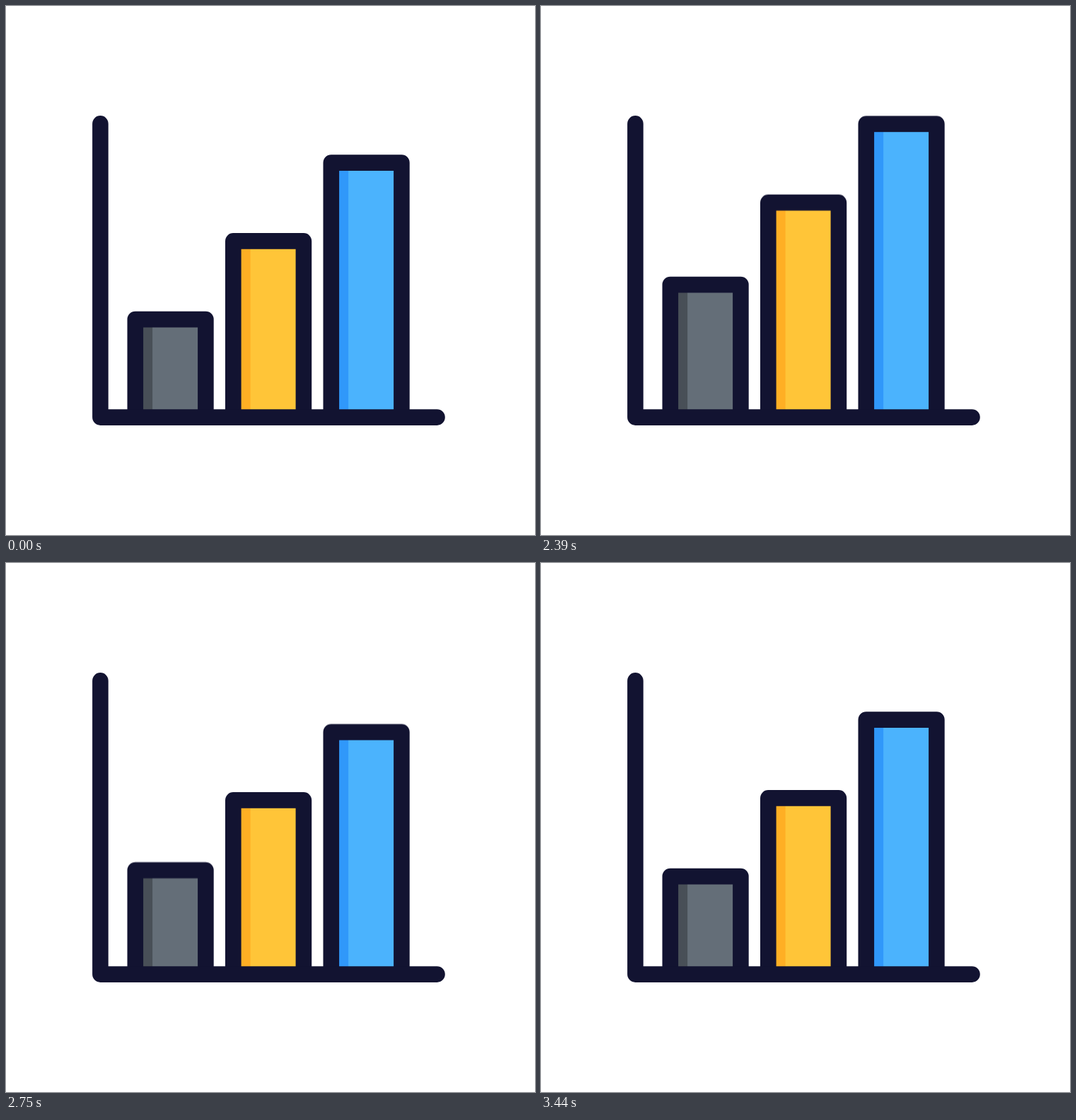
Animation of 748 by 748 pixels, one loop 3.47 s. Source, as an HTML page without scripts:

```html
<!DOCTYPE html>
<html lang="en">
<head>
<meta charset="utf-8">
<title>Bar chart</title>
<style>
  html, body { margin: 0; width: 100%; height: 100%; overflow: hidden; background: #fff; }
  svg { display: block; width: 100%; height: 100%; }
  .line { fill: none; stroke: #121331; stroke-width: 22.6; stroke-linecap: round; stroke-linejoin: round; }
  .bar { animation: bounce 3.47s infinite; }
  .gray { --face: #646e78; --shade: #484f57; }
  .yellow { --face: #ffc538; --shade: #ffaf24; animation-delay: 60ms; }
  .blue { --face: #4bb3fd; --shade: #3098fa; animation-delay: 120ms; }
  .face { fill: var(--face); }
  .shade { fill: var(--shade); }

  /* Rise, then a damped settle */
  @keyframes bounce {
    0% { transform: translateY(0); }
    57.64% { transform: translateY(0); animation-timing-function: cubic-bezier(.32, .45, .6, 1); }
    65.85% { transform: translateY(-55px); }
    66.28% { transform: translateY(-55px); animation-timing-function: cubic-bezier(.87, 0, .55, 1); }
    73.8% { transform: translateY(22.5px); animation-timing-function: cubic-bezier(.5, 0, .5, 1); }
    80.72% { transform: translateY(-11px); animation-timing-function: cubic-bezier(.5, 0, .5, 1); }
    86.77% { transform: translateY(6px); animation-timing-function: cubic-bezier(.33, 0, .2, 1); }
    93.08%, 100% { transform: translateY(0); }
  }
</style>
</head>
<body>
<svg viewBox="0 0 748 748">
  <defs>
    <clipPath id="above"><rect width="748" height="581"/></clipPath>
    <g id="column">
      <rect class="face" width="99.6" height="500"/>
      <rect class="shade" width="24.3" height="500"/>
      <path class="line" d="M0 500V0H99.6V500"/>
    </g>
  </defs>
  <g clip-path="url(#above)">
    <g class="bar gray"><use href="#column" x="182.8" y="443.1"/></g>
    <g class="bar yellow"><use href="#column" x="321.3" y="332.4"/></g>
    <g class="bar blue"><use href="#column" x="459.8" y="221.6"/></g>
  </g>
  <path class="line" d="M133.4 166.4V581.6H609.5"/>
</svg>
</body>
</html>
```
